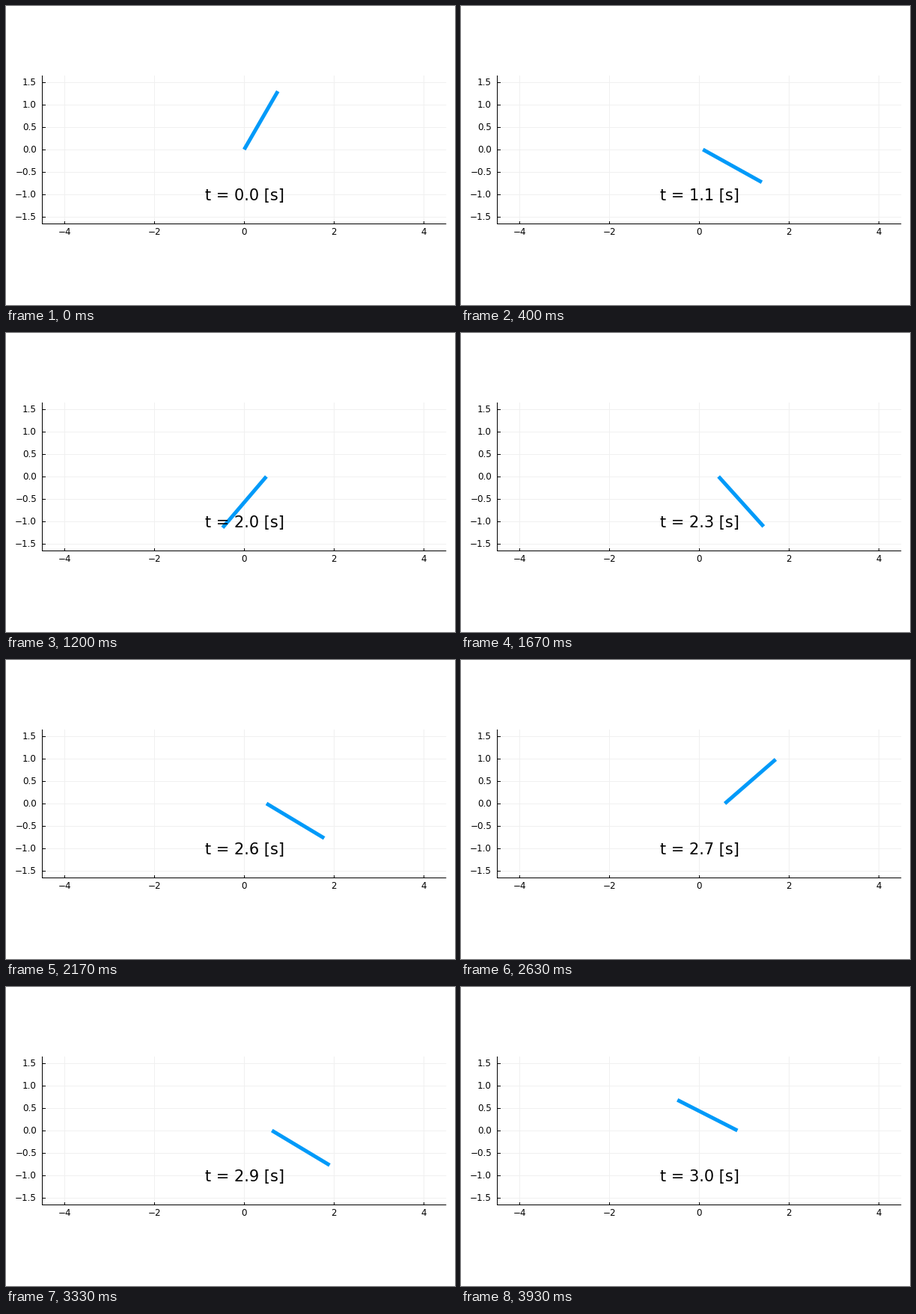
Write a matplotlib script that moves like this. It is 600 by 400 pixels and loops after 3.96 s.

```python
import numpy as np
import matplotlib.pyplot as plt
from matplotlib.animation import FuncAnimation

plt.rcParams["font.family"] = "DejaVu Sans"

W, H, DPI = 600, 400, 100
PX = 72 / DPI                      # points per pixel
UNIT, X0, Y0 = 60, 318.3, 192      # data scale and origin in pixels
LEFT, RIGHT, TOP, BOTTOM = 48.3, 588.3, 93, 291
GRID = "#f0f0f0"

ROD = 1.5 * UNIT
SWAY = 7.5                         # cart recoil opposite to the rod
REST, LAST = 2, 118                # last idle step, final step
SPIN = 22                          # step where the spin reaches full speed

# Total turn in degrees once the rod spins; the last step is cut short.
SPIN_STEPS = [SPIN, 34, 50, 65, LAST - 1, LAST]
SPIN_TURNS = [563, 1488, 2628, 3691, 7435, 7467]

fig = plt.figure(figsize=(W / DPI, H / DPI), dpi=DPI, facecolor="white")
ax = fig.add_axes([0, 0, 1, 1])
ax.set(xlim=(0, W), ylim=(H, 0))
ax.axis("off")


def rule(x1, y1, x2, y2, color="black", z=2):
    """Hairline centred on whole pixels."""
    if x1 == x2:
        x1 = x2 = np.floor(x1) + .5
    else:
        y1 = y2 = np.floor(y1) + .5
    ax.plot([x1, x2], [y1, y2], color=color, lw=PX, snap=False,
            solid_capstyle="butt", zorder=z)


def label(x, y, text, size=8.6, ha="center"):
    return ax.text(x, y, text, fontsize=size, ha=ha, va="baseline",
                   color="black", zorder=5)


def number(value, form):
    return format(value, form).replace("-", "\u2212")


for v in range(-4, 5, 2):
    x = X0 + v * UNIT
    rule(x, TOP, x, BOTTOM, GRID, z=1)
    rule(x, BOTTOM, x, BOTTOM - 3)
    label(x, 305.8, number(v, "d"))

for v in np.arange(-1.5, 1.6, 0.5):
    y = Y0 - v * UNIT
    rule(LEFT, y, RIGHT, y, GRID, z=1)
    rule(LEFT, y, LEFT + 4.7, y)
    label(41, y + 4.2, number(v, ".1f"), ha="right")

rule(LEFT, TOP, LEFT, BOTTOM + 1)
rule(LEFT - .3, BOTTOM, RIGHT, BOTTOM)

rod, = ax.plot([], [], color="#009af9", lw=5 * PX,
               solid_capstyle="butt", zorder=3)
clock = label(X0 + .3, 260, "", 15)


def turn(step):
    """Clockwise turn: a slow fall that builds up into a steady spin."""
    if step < SPIN:
        return SPIN_TURNS[0] * (max(step - REST, 0) / (SPIN - REST)) ** 2.66
    return np.interp(step, SPIN_STEPS, SPIN_TURNS)


def centre(step):
    return 322 + 40.7 * (1 - (1 - step / LAST) ** 2)


def seconds(step):
    """Time steps shrink as the rod speeds up."""
    u = max(step - REST, 0) / (LAST - REST)
    return 3 * (1 - (1 - u ** .56) ** 1.56)


def draw(i):
    step = (3 * i + 1) // 10       # 30 solver steps per second, 10 ms ticks
    a = np.radians(60 - turn(step))
    x = centre(step) - SWAY * np.cos(a)
    rod.set_data([x, x + ROD * np.cos(a)], [Y0, Y0 - ROD * np.sin(a)])
    clock.set_text(f"t = {seconds(step):.1f} [s]")
    return rod, clock


anim = FuncAnimation(fig, draw, frames=396, interval=10,
                     repeat=True, repeat_delay=0)
plt.show()
```
